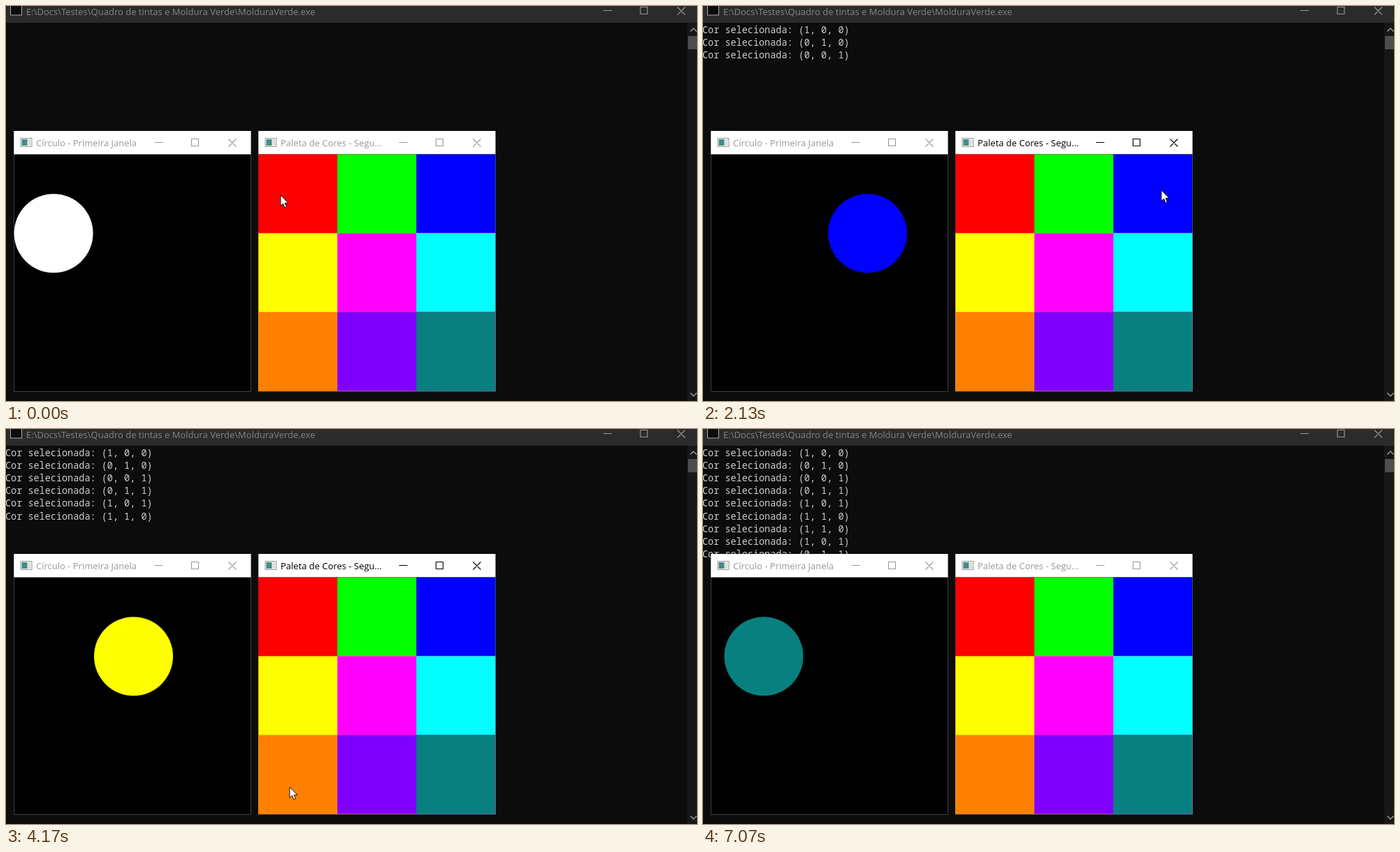
Recreate the animation shown at these times as an HTML page. Size 989 px wide and 566 px high, loop 7110 ms.

```html
<!DOCTYPE html>
<html lang="pt">
<head>
<meta charset="utf-8">
<title>Paleta</title>
<style>
  html, body { margin: 0; width: 100%; height: 100%; overflow: hidden; background: #0c0c0c; }
  svg { display: block; width: 989px; height: 566px; }
  text { white-space: pre; }
  .title { font: 13px "Open Sans", "Noto Sans", sans-serif; }
  .log { font: 13.5px "Noto Sans Mono", "DejaVu Sans Mono", monospace; fill: #ccc; }
  .buttons { fill: none; stroke: currentColor; stroke-width: 1.1; }
  .window { color: #999; }
  .window.active { color: #000; }
  .window .title { fill: currentColor; }
</style>
</head>
<body>
<svg viewBox="0 0 989 566">
  <defs>
    <path id="buttons" d="M0 6H12M53 1H63V11H53ZM106 1L117 12M117 1L106 12"/>
    <g id="frame">
      <rect x=".5" y=".5" width="339" height="373" fill="#000" stroke="#3c3c46"/>
      <rect x=".3" width="339.2" height="33.5" fill="#fff"/>
      <rect x="10" y="10.5" width="16" height="12" fill="#f4f4f4" stroke="#999"/>
      <rect x="11.5" y="12" width="8" height="9" fill="#3f8f87"/>
      <rect x="20.5" y="12" width="4" height="9" fill="#ddd"/>
      <use href="#buttons" class="buttons" x="201.5" y="10.5"/>
    </g>
  </defs>

  <rect width="989" height="566" fill="#0c0c0c"/>
  <rect width="989" height="24" fill="#2b2b2b"/>
  <rect x="6.5" y="-1" width="16" height="14" fill="#0c0c0c" stroke="#aaa"/>
  <text class="title" x="29" y="12.5" fill="#858585">E:\Docs\Testes\Quadro de tintas e Moldura Verde\MolduraVerde.exe</text>
  <use href="#buttons" class="buttons" x="855" y=".5" color="#999"/>
  <rect x="975" y="24" width="14" height="542" fill="#171717"/>
  <rect x="976" y="43" width="13" height="19" fill="#4d4d4d"/>
  <path d="M979.5 36.5L984 32L988.5 36.5M979.5 554.5L984 559L988.5 554.5" fill="none" stroke="#999" stroke-width="1.5"/>

  <g id="log"></g>

  <g class="window" transform="translate(11 179)">
    <use href="#frame"/>
    <text class="title" x="32" y="22">Círculo - Primeira Janela</text>
    <circle id="ball" cy="146.7" r="56.5"/>
  </g>

  <g class="window" id="palette" transform="translate(361 179)">
    <use href="#frame"/>
    <text class="title" x="32" y="22">Paleta de Cores - Segu...</text>
    <g id="cells"></g>
  </g>

  <path id="cursor" d="M0 0V15.5L3.6 12.2L6 18L8.5 16.9L6.1 11.3H11Z" fill="#fff" stroke="#000" stroke-width=".9"/>
</svg>

<script>
const LOOP = 7110, BLUR = 7070;
const CELL = 113, GRID_X = 0.3, GRID_Y = 33.5;
const BALL_MIN = 57, BALL_SPAN = 2 * CELL;
const PRINT_DELAY = 90, REST = 130, GLIDE = 250;

const COLORS = ["#ff0000", "#00ff00", "#0000ff", "#ffff00", "#ff00ff", "#00ffff", "#ff8000", "#8000ff", "#088080"];

// The pointer clicks at these places; colour and console line follow from the cell hit
const CLICKS = [
  { at: 700, x: 393, y: 271 },
  { at: 1370, x: 519, y: 264 },
  { at: 2030, x: 656, y: 264 },
  { at: 2600, x: 645, y: 402 },
  { at: 3050, x: 530, y: 392 },
  { at: 3430, x: 441, y: 383 },
  { at: 4470, x: 406, y: 513 },
  { at: 5040, x: 546, y: 497 },
  { at: 5660, x: 655, y: 498 }
];
const EXIT = { leave: 6230, x: 945, y: 580 };

// The ball runs in bursts: start, end, pixels covered
const BURSTS = [[0, 2270, 178.5], [2600, 3900, 159], [4470, 4730, 34], [5000, 5700, 60], [6230, 6600, 39.5]];

const $ = id => document.getElementById(id);
const clamp = u => Math.max(0, Math.min(1, u));

function add(parent, tag, attrs, content = "") {
  const node = document.createElementNS("http://www.w3.org/2000/svg", tag);
  for (const key in attrs) node.setAttribute(key, attrs[key]);
  node.textContent = content;
  parent.append(node);
  return node;
}

// Each cell reaches to the far corner; later cells cover the rest, so no seams show
COLORS.forEach((fill, i) => {
  const col = i % 3, row = Math.floor(i / 3);
  add($("cells"), "rect", {
    x: GRID_X + col * CELL, y: GRID_Y + row * CELL,
    width: (3 - col) * CELL, height: (3 - row) * CELL, fill
  });
});

const colorAt = ({ x, y }) =>
  COLORS[Math.floor((x - 361) / CELL) + 3 * Math.floor((y - 213) / CELL)];

const lines = CLICKS.map((click, i) => {
  const rgb = colorAt(click).match(/\w\w/g).map(hex => Math.round(parseInt(hex, 16) / 255));
  return add($("log"), "text", { class: "log", x: -1, y: 39 + i * 18.1 }, `Cor selecionada: (${rgb.join(", ")})`);
});

const moves = [
  ...CLICKS.slice(1).map((click, i) => ({ ...click, leave: CLICKS[i].at + REST })),
  EXIT
];

function pointerAt(time) {
  let { x, y } = CLICKS[0];
  for (const move of moves) {
    const u = clamp((time - move.leave) / GLIDE), ease = u * u * (3 - 2 * u);
    x += (move.x - x) * ease;
    y += (move.y - y) * ease;
  }
  return [Math.round(x), Math.round(y)];
}

function ballX(time) {
  const distance = BURSTS.reduce((sum, [start, end, length]) =>
    sum + length * clamp((time - start) / (end - start)), 0);
  const phase = distance % (2 * BALL_SPAN);
  return BALL_MIN + Math.min(phase, 2 * BALL_SPAN - phase);
}

function draw(time) {
  const last = CLICKS.findLast(click => time >= click.at);
  $("ball").setAttribute("cx", ballX(time));
  $("ball").setAttribute("fill", last ? colorAt(last) : "#fff");
  $("palette").classList.toggle("active", !!last && time < BLUR);
  $("cursor").setAttribute("transform", `translate(${pointerAt(time)})`);
  lines.forEach((line, i) =>
    line.setAttribute("visibility", time >= CLICKS[i].at + PRINT_DELAY ? "visible" : "hidden"));
}

const begin = performance.now();
function tick() {
  draw((performance.now() - begin) % LOOP);
  requestAnimationFrame(tick);
}
tick();
</script>
</body>
</html>
```
